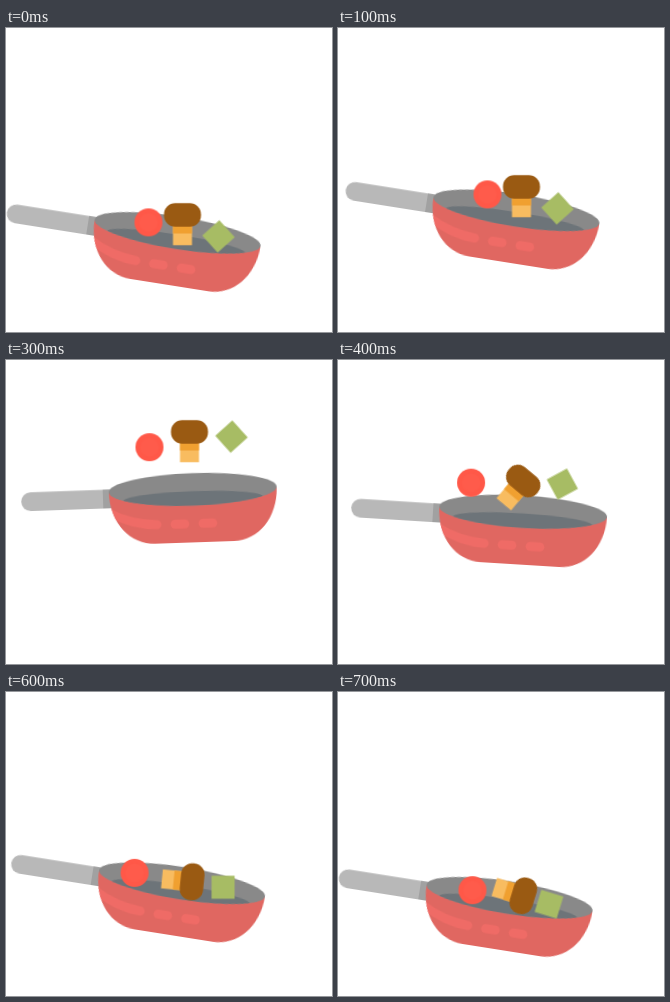
An HTML page for the animation above (0.8 s loop, 326 by 304 pixels).

```html
<!DOCTYPE html>
<html lang="en">
<head>
<meta charset="utf-8">
<title>Frying pan</title>
<style>
  html, body { margin: 0; width: 100%; height: 100%; overflow: hidden; background: #fff; }
  svg { display: block; width: 326px; height: 304px; }
  #pan, #tomato, #mushroom, #leek { transform-box: view-box; transform-origin: 0 0; }
</style>
</head>
<body>
<svg viewBox="0 0 326 304">
  <defs>
    <path id="bowl" d="M-84 0C-84 31-64 53-39.5 53H39.5C64 53 84 31 84 0Z"/>
    <clipPath id="inBowl"><use href="#bowl"/></clipPath>
    <clipPath id="inRim"><ellipse rx="84" ry="16.3"/></clipPath>
  </defs>

  <g id="pan">
    <path fill="#b8b8b8" d="M-80-2.8H-162.4a9.4 9.4 0 0 0 0 18.8H-80Z"/>
    <rect x="-90" y="-2.8" width="10" height="18.8" fill="#a1a1a1"/>
    <use href="#bowl" fill="#e06761"/>
    <g fill="#ef6b66" clip-path="url(#inBowl)">
      <path d="M-86 15Q-64 28-37 29.5a4.5 4.5 0 0 1 0 9Q-62 38-82 26Z"/>
      <rect x="-23.3" y="29.8" width="18.6" height="9" rx="4.5"/>
      <rect x="4.7" y="29.8" width="18.6" height="9" rx="4.5"/>
    </g>
    <ellipse rx="84" ry="16.3" fill="#898989"/>
    <ellipse cy="9.3" rx="70" ry="7.5" fill="#6d7479" clip-path="url(#inRim)"/>
  </g>

  <g id="tomato">
    <circle r="14" fill="#ff5848"/>
    <circle r="9.5" fill="#ff5b4b"/>
  </g>

  <g id="mushroom">
    <rect x="-9.5" y="10" width="19" height="20.3" fill="#f8bc60"/>
    <rect x="-9.5" y="10" width="19" height="8.5" fill="#f0a030"/>
    <rect x="-18.5" y="-11.7" width="37" height="23.4" rx="11.2" fill="#9a5a12"/>
  </g>

  <g id="leek">
    <rect x="-11.5" y="-11.5" width="23" height="23" fill="#a7bc64"/>
  </g>
</svg>
<script>
  const STEPS = 8, STEP_MS = 100;
  const PEAK = 3;   // step at which everything is highest
  const LAST = STEPS - 1;

  const mix = (a, b, p) => a + (b - a) * p;
  const easeOut = (p, power) => 1 - (1 - p) ** power;
  const arc = p => Math.sin(Math.PI * p);
  const fallTime = step => (step - PEAK) / (LAST - PEAK);

  // The pan swings up along an arc and levels out near the top
  function panPose(step) {
    const rising = step <= PEAK;
    const lift = rising ? (step / PEAK) ** 1.1 : (1 - fallTime(step)) ** 1.2;
    const level = Math.max(0, (lift - 0.3) / 0.7) ** 1.3;
    return {
      x: 171.6 + 15.1 * Math.sin(lift * Math.PI / 2),
      y: mix(rising ? 204.8 : 205.7, 129.4, lift),
      angle: 9 - 11 * level
    };
  }

  // Food rides the pan for one step, is tossed outwards, then tumbles back
  function foodPose(food, step) {
    const { rest, side, top, land, sway, brake, spin, spinBrake } = food;
    const ride = Math.min(step, 1);
    const x = rest.x + 7 * ride, y = rest.y - 28 * ride;
    const peakX = x + 6 * side;
    if (step <= PEAK) {
      const p = Math.max(0, (step - 1) / (PEAK - 1)) ** 0.93;
      return { x: mix(x, peakX, p) + 7 * side * arc(p), y: mix(y, top, p), angle: spin.from };
    }
    const p = fallTime(step);
    return {
      x: mix(peakX, land.x, p) + sway * arc(p),
      y: mix(top, land.y, easeOut(p, brake)),
      angle: mix(spin.from, spin.to, easeOut(p, spinBrake))
    };
  }

  const foods = {
    tomato: {
      rest: { x: 142.5, y: 194.4 }, top: 87.2, land: { x: 134.5, y: 198.2 },
      side: -1, sway: -11.5, brake: 1.34, spin: { from: 0, to: 0 }, spinBrake: 1
    },
    mushroom: {
      rest: { x: 176.5, y: 186.9 }, top: 71.9, land: { x: 185.3, y: 203.8 },
      side: 0, sway: 1.8, brake: 1.62, spin: { from: 0, to: 107 }, spinBrake: 1.62
    },
    leek: {
      rest: { x: 212.5, y: 208.4 }, top: 76.6, land: { x: 211, y: 212.2 },
      side: 1, sway: 3.5, brake: 1.5, spin: { from: 48, to: 107 }, spinBrake: 0.9
    }
  };

  // Each pose is held for one step
  function play(id, poseAt) {
    const frames = Array.from({ length: STEPS + 1 }, (_, i) => {
      const { x, y, angle } = poseAt(Math.min(i, LAST));
      return {
        offset: i / STEPS,
        easing: "step-end",
        transform: `translate(${x}px, ${y}px) rotate(${angle}deg)`
      };
    });
    document.getElementById(id).animate(frames, { duration: STEPS * STEP_MS, iterations: Infinity });
  }

  play("pan", panPose);
  for (const [id, food] of Object.entries(foods)) play(id, step => foodPose(food, step));
</script>
</body>
</html>
```
